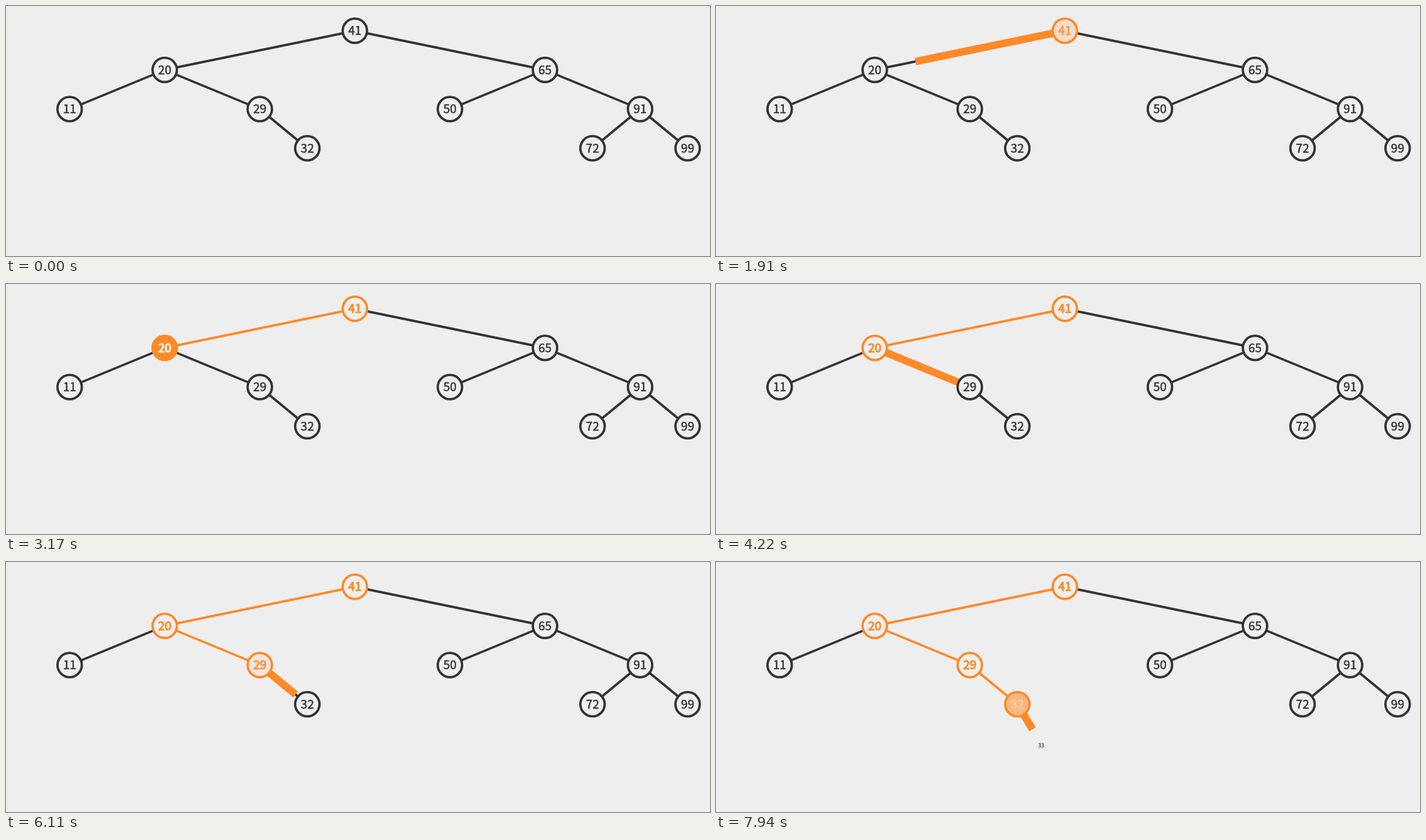
Animation, 1120 px wide and 399 px high, one loop 8 s. Source, as an HTML page with a canvas:

```html
<!DOCTYPE html>
<html lang="en">
<head>
<meta charset="utf-8">
<title>Binary search tree insertion</title>
<style>
  html, body { margin: 0; width: 100%; height: 100%; overflow: hidden; background: #eee; }
  canvas { display: block; width: 1120px; height: 399px; }
</style>
</head>
<body>
<canvas id="stage"></canvas>
<script>
const W = 1120, H = 399, LOOP = 8000;
const PAPER = [238, 238, 238], INK = [51, 51, 51], HOT = [255, 138, 39], WHITE = [255, 255, 255];
const OUTER = 21.25, INNER = 17.5, RIM = 20;
const THIN = 3.75, THICK = 12;
const FONT_SIZE = 19, BASELINE = 6.8;
const FONT = '"Noto Sans CJK JP", "Noto Sans CJK SC", "Noto Sans CJK", "Open Sans", sans-serif';

const FILL_MS = 760, RUN_MS = 933;

// Each visited node fills, then its edge runs to the next node and thins.
const steps = [
  { value: 41, fill: 390, run: 1305, thin: 2240 },
  { value: 20, fill: 2490, run: 3350, thin: 4310 },
  { value: 29, fill: 4530, run: 5426, thin: 6350 },
  { value: 32, fill: 6600, run: 7489, thin: Infinity }
];

const nodes = new Map();
const edges = [];

// Place a subtree given as [value, left, right].
function place(tree, x, depth, parent) {
  if (!tree) return;
  const [value, left, right] = tree;
  const node = { value, x, y: 39.5 + 62.5 * depth };
  nodes.set(value, node);
  if (parent) edges.push({ from: parent, to: node });
  const dx = 302.5 / 2 ** depth;
  place(left, x - dx, depth + 1, node);
  place(right, x + dx, depth + 1, node);
}

place([41,
  [20, [11], [29, null, [32]]],
  [65, [50], [91, [72], [99]]]
], 555, 0, null);

const added = { value: 33, x: nodes.get(32).x + 37.8, y: 289.5 };
const path = [...steps.map(s => nodes.get(s.value)), added];
steps.forEach((step, i) => {
  step.from = path[i];
  step.to = path[i + 1];
  step.from.step = step;
  const edge = edges.find(e => e.from === step.from && e.to === step.to);
  if (edge) edge.step = step;
});

const canvas = document.getElementById('stage');
const ctx = canvas.getContext('2d');
const ratio = window.devicePixelRatio || 1;
canvas.width = Math.round(W * ratio);
canvas.height = Math.round(H * ratio);

function ease(t, start, length) {
  const u = Math.min(1, Math.max(0, (t - start) / length));
  return u < 0.5 ? 4 * u ** 3 : 1 - 4 * (1 - u) ** 3;
}

const rgb = c => `rgb(${c.map(Math.round).join(',')})`;
const mix = (a, b, p) => a.map((v, i) => v + (b[i] - v) * p);

// Line between the rims of two nodes, drawn up to the given part.
function drawLine(a, b, color, width, part = 1, endGap = RIM) {
  const length = Math.hypot(b.x - a.x, b.y - a.y);
  const ux = (b.x - a.x) / length, uy = (b.y - a.y) / length;
  const end = RIM + (length - RIM - endGap) * part;
  ctx.strokeStyle = rgb(color);
  ctx.lineWidth = width;
  ctx.beginPath();
  ctx.moveTo(a.x + ux * RIM, a.y + uy * RIM);
  ctx.lineTo(a.x + ux * end, a.y + uy * end);
  ctx.stroke();
}

function drawDisc(x, y, radius, color) {
  ctx.fillStyle = rgb(color);
  ctx.beginPath();
  ctx.arc(x, y, radius, 0, 2 * Math.PI);
  ctx.fill();
}

function drawNumber(node, color, size, weight) {
  ctx.font = `${size}px ${FONT}`;
  ctx.fillStyle = ctx.strokeStyle = rgb(color);
  ctx.lineWidth = weight;
  ctx.fillText(node.value, node.x, node.y + BASELINE);
  ctx.strokeText(node.value, node.x, node.y + BASELINE);
}

function drawNode(node, t) {
  const { step } = node;
  const on = step ? ease(t, step.fill, FILL_MS) : 0;
  const off = step ? ease(t, step.run, RUN_MS) : 0;
  drawDisc(node.x, node.y, OUTER, mix(INK, HOT, on));
  drawDisc(node.x, node.y, INNER, mix(mix(PAPER, HOT, on), PAPER, off));
  drawNumber(node, mix(mix(INK, WHITE, on), HOT, off), FONT_SIZE, 0.5 + 0.6 * on);
}

function draw(t) {
  ctx.setTransform(ratio, 0, 0, ratio, 0, 0);
  ctx.fillStyle = rgb(PAPER);
  ctx.fillRect(0, 0, W, H);
  ctx.textAlign = 'center';
  ctx.lineJoin = 'round';

  for (const { from, to, step } of edges) {
    const done = step && t >= step.thin;
    drawLine(from, to, done ? HOT : INK, THIN);
  }
  for (const { from, to, run, thin } of steps) {
    const part = ease(t, run, RUN_MS);
    if (part > 0 && t < thin) drawLine(from, to, HOT, THICK, part, to === added ? -6 : RIM);
  }
  nodes.forEach(node => drawNode(node, t));

  const grow = ease(t, steps[3].run, RUN_MS);
  if (grow > 0.02) drawNumber(added, INK, FONT_SIZE * grow, 0.5 * grow);
}

const begin = performance.now();
function tick() {
  draw((performance.now() - begin) % LOOP);
  requestAnimationFrame(tick);
}
tick();
</script>
</body>
</html>
```
